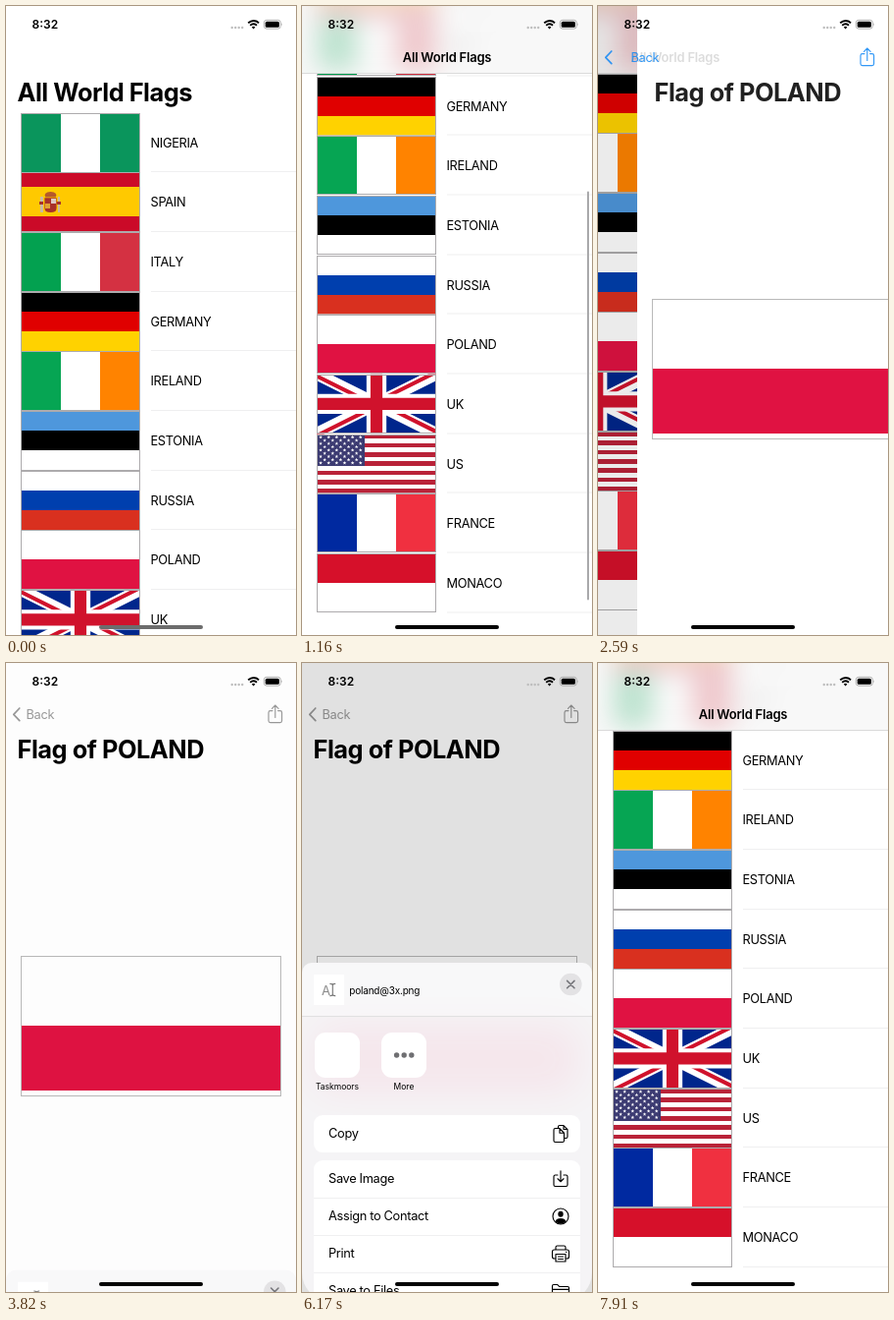
Write an HTML page that moves like this. It is 296 px wide and 640 px high and loops after 8 s.

```html
<!DOCTYPE html>
<html lang="en">
<head>
<meta charset="utf-8">
<title>All World Flags</title>
<style>
html, body { margin: 0; width: 100%; height: 100%; overflow: hidden; background: #fff; }
body { position: relative; font: 12.8px Inter, "Liberation Sans", sans-serif; letter-spacing: -.025em; color: #000; }
div, svg, span { position: absolute; box-sizing: border-box; }
span { white-space: nowrap; }
svg { overflow: visible; }
.page { left: 0; top: 0; width: 296px; height: 640px; overflow: hidden; background: #fff; }
.line { fill: none; stroke: currentColor; stroke-width: 1.15; stroke-linecap: round; stroke-linejoin: round; }

.big { left: 11.5px; top: 70px; font-size: 25.4px; font-weight: 700; letter-spacing: -.019em; line-height: 36px; }
.small { left: 0; width: 296px; top: 42px; line-height: 20px; text-align: center; font-size: 13px; font-weight: 600; letter-spacing: -.018em; }

#list { transform: translateX(calc(var(--d) * .3px - 88.8px)); }
.scroll { left: 0; top: 0; width: 296px; transform: translateY(calc(var(--s) * -1px)); }
.row { left: 0; width: 296px; height: 60.67px; line-height: 60.67px; }
.row svg { left: 15px; top: 0; width: 122px; height: 60.67px; overflow: hidden; }
.row rect { shape-rendering: crispEdges; }
.row span { left: 147.5px; top: 1px; }
.row i { position: absolute; left: 148px; right: 0; bottom: 0; height: 1px; background: #efeff0; }
.row.hit { background: rgba(209, 209, 214, var(--hit)); }
.cover, .bar { left: 0; top: 0; width: 296px; height: 69px; overflow: hidden; }
.cover { background: #fff; opacity: calc(1 - var(--bar)); }
.bar { opacity: var(--bar); background: #f8f8f8; border-bottom: .5px solid #dadada; }
.glow { left: 0; top: -30px; width: 296px; height: 95px; overflow: hidden; opacity: .24; filter: blur(13px); }
.glow .scroll { top: 30px; }
#thumb { left: 290.9px; top: 0; width: 2.4px; height: 416px; border-radius: 2px; background: #a9a9ab; opacity: var(--thumb); transform: translateY(calc(var(--thumbY) * 1px)); }
#shade { inset: 0; background: #000; opacity: calc(var(--p) * .09); }

#detail { transform: translateX(calc(var(--d) * 1px)); }
#detail .big { opacity: var(--p); transform: translateX(calc(var(--d) * .15px)); }
#flag { left: 15px; top: 298px; width: 266px; height: 142.5px; border: 1px solid #b9b9b9; }
#flag div { left: 0; top: 70px; width: 264px; height: 66px; background: #e01242; }

#nav { left: 0; top: 0; color: var(--tint); }
#nav .small { color: #000; opacity: calc(var(--bar) * (1 - var(--p))); transform: translateX(calc(var(--p) * -80px)); }
#chev, #back { opacity: var(--back); }
#back { left: 20.5px; top: 43px; line-height: 20px; transform: translateX(calc(var(--d) * .325px)); }
#share { opacity: var(--share); }

#dim { left: 0; top: 0; width: 296px; height: 640px; background: #000; opacity: calc((1 - var(--k)) * .12); }
#sheet { left: 0; top: 295px; width: 296px; height: 345px; border-radius: 10px 10px 30px 30px; overflow: hidden; background: #f5f4f6; transform: translateY(calc(var(--k) * 347px)); }
.blush { left: 15px; top: 75px; width: 266px; height: 66px; background: #ff1450; opacity: .06; filter: blur(20px); transform: translateY(calc(var(--k) * -347px)); }
.head { left: 0; top: 0; width: 296px; height: 54.5px; background: rgba(255, 255, 255, .3); border-bottom: 1px solid #e0dfe1; }
.pic { left: 12px; top: 12px; width: 31px; height: 31px; background: #fff; }
.tile { top: 71px; width: 46px; height: 46px; border-radius: 11px; background: #fff; }
.label { top: 120px; width: 72px; text-align: center; font-size: 8.5px; line-height: 12px; letter-spacing: 0; }
.card { left: 12px; width: 272px; border-radius: 9px; background: #fff; }
.card span { left: 15px; line-height: 38px; }
.card svg { left: 242px; width: 20px; height: 20px; }
.card i { position: absolute; left: 0; right: 0; height: 1px; background: #f0f0f1; }

#status { left: 0; top: 0; }
#home { left: 95px; top: 629.7px; width: 106px; height: 4.2px; border-radius: 3px; background: var(--home); }
</style>
</head>
<body>
<div class="page" id="list">
  <div class="scroll"><span class="big">All World Flags</span></div>
  <div id="thumb"></div>
  <div class="cover"></div>
  <div class="bar"><div class="glow"><div class="scroll"></div></div></div>
  <div id="shade"></div>
</div>

<div class="page" id="detail">
  <span class="big">Flag of POLAND</span>
  <div id="flag"><div></div></div>
</div>

<div id="nav">
  <span class="small">All World Flags</span>
  <svg id="chev" class="line" width="20" height="64"><path d="M13.8 46 7.8 52.3l6 6.3" stroke-width="1.7"/></svg>
  <span id="back">Back</span>
  <svg id="share" class="line" width="296" height="64"><path d="M272 48.6h-2.2q-1.8 0-1.8 1.8v8.4q0 1.8 1.8 1.8h10q1.8 0 1.8-1.8v-8.4q0-1.8-1.8-1.8h-2.2M274.8 55.5V43.2M271.5 46.3l3.3-3.3 3.3 3.3"/></svg>
</div>

<div id="dim"></div>

<svg id="status" width="296" height="40">
  <g fill="#bdbdbd"><circle cx="230.7" cy="22" r="1.2"/><circle cx="234.2" cy="22" r="1.2"/><circle cx="237.7" cy="22" r="1.2"/><circle cx="241.2" cy="22" r="1.2"/></g>
  <g fill="none" stroke="#000" stroke-width="1.9"><path d="M247.2 17.2q5.4-4.6 10.8 0M249.2 19.7q3.4-2.8 6.8 0"/></g>
  <path d="M250.8 21.4q1.8-1.4 3.6 0l-1.8 2z"/>
  <rect x="263.3" y="14.3" width="17" height="8.8" rx="2.7" fill="none" stroke="#a5a5a5" stroke-width=".9"/>
  <rect x="264.7" y="15.7" width="14.2" height="6" rx="1.5"/>
  <path d="M281.3 17.2q1.4 1.5 0 3z" fill="#a5a5a5"/>
</svg>
<span style="left:26.5px;top:9px;line-height:20px;font-size:12px;font-weight:600;letter-spacing:0">8:32</span>

<div id="sheet">
  <div class="blush"></div>
  <div class="head"></div>
  <div class="pic"></div>
  <span style="left:20px;top:18px;line-height:20px;font-size:13px;color:#8a8a8a">A</span>
  <svg class="line" width="40" height="40" style="color:#777"><path d="M28.8 21.3q2.5 0 2.5 1.4v9.5q0 1.4-2.5 1.4M33.8 21.3q-2.5 0-2.5 1.4M33.8 33.6q-2.5 0-2.5-1.4"/></svg>
  <span style="left:48.3px;top:18px;line-height:20px;font-size:10px;letter-spacing:-.02em">poland@3x.png</span>
  <svg width="296" height="50"><circle cx="274.3" cy="22" r="11.3" fill="#e3e2e4"/><path d="m270.6 18.3 7.4 7.4m0-7.4-7.4 7.4" stroke="#77777c" stroke-width="1.6" stroke-linecap="round"/></svg>
  <div class="tile" style="left:13px"></div>
  <div class="tile" style="left:81px"></div>
  <svg width="130" height="110" fill="#6f6f72"><circle cx="96.600" cy="94" r="2.700"/><circle cx="104.200" cy="94" r="2.700"/><circle cx="111.800" cy="94" r="2.700"/></svg>
  <span class="label" style="left:0">Taskmoors</span>
  <span class="label" style="left:68px">More</span>
  <div class="card" id="copy" style="top:154.5px;height:38.5px"></div>
  <div class="card" id="more" style="top:200.5px;height:152px"></div>
</div>
<div id="home"></div>

<script>
const $ = id => document.getElementById(id);
const rect = (x, y, w, h, c) => `<rect x="${x}" y="${y}" width="${w}" height="${h}" fill="${c}"/>`;

// Flags live in a 60 x 30 box
const rows = (...list) => list.map((c, i) => rect(0, i * 30 / list.length, 60, 30 / list.length, c)).join('');
const cols = (...list) => list.map((c, i) => rect(i * 20, 0, 20, 30, c)).join('');

function spain() {
  const red = '#cb0a28', gold = '#ffc900', dark = '#a8322a';
  return rows(red, gold, gold, red) +
    rect(9.9, 12.2, 1.2, 8, '#c9b9a2') + rect(18.7, 12.2, 1.2, 8, '#c9b9a2') +
    rect(9.5, 15, 2, 1.1, dark) + rect(18.3, 15, 2, 1.1, dark) +
    `<path d="M12 13h6v5q0 2.3-3 2.3t-3-2.3z" fill="${dark}"/>` +
    rect(15, 13.4, 2.5, 2.2, '#dcc9c4') + rect(12.5, 16, 2.4, 2.2, '#e0a436') +
    `<path d="M12.4 12.6q-1.2-2.4 2.6-2.7 3.8.3 2.6 2.7z" fill="#b4592c"/>`;
}

function uk() {
  const blue = '#00268c', red = '#d0122c';
  return rect(0, 0, 60, 30, blue) +
    '<path d="M0 0 60 30M60 0 0 30" stroke="#fff" stroke-width="6"/>' +
    `<path d="M0 1 30 16M60 29 30 14M0 31 30 16M60-1 30 14" stroke="${red}" stroke-width="2"/>` +
    '<path d="M30 0v30M0 15h60" stroke="#fff" stroke-width="10"/>' +
    `<path d="M30 0v30M0 15h60" stroke="${red}" stroke-width="6"/>`;
}

function star(x, y) {
  const pts = Array.from({ length: 10 }, (_, i) => {
    const a = i * Math.PI / 5, r = i % 2 ? .4 : .95;
    return [(x + r * Math.sin(a)).toFixed(2), (y - r * Math.cos(a)).toFixed(2)];
  });
  return `<polygon points="${pts.join(' ')}" fill="#fff"/>`;
}

function us() {
  let art = rows(...Array.from({ length: 13 }, (_, i) => i % 2 ? '#fff' : '#b92238'));
  art += rect(0, 0, 24, 30 * 7 / 13, '#3c3b72');
  for (let r = 1; r < 10; r++)
    for (let c = 1; c < 12; c++)
      if ((r + c) % 2 === 0) art += star(c * 2, r * 1.615);
  return art;
}

const flags = {
  NIGERIA: cols('#0a955c', '#fff', '#0a955c'),
  SPAIN: spain(),
  ITALY: cols('#03a150', '#fff', '#d43142'),
  GERMANY: rows('#000', '#e00000', '#ffd200'),
  IRELAND: cols('#06a553', '#fff', '#ff8300'),
  ESTONIA: rows('#4e97dc', '#000', '#fff'),
  RUSSIA: rows('#fff', '#003fae', '#d9301f'),
  POLAND: rows('#fff', '#e01242'),
  UK: uk(),
  US: us(),
  FRANCE: cols('#0029a0', '#fff', '#f03040'),
  MONACO: rows('#d6102a', '#fff')
};

// The same rows fill the list and the blurred copy behind the bar
const rowsHtml = Object.entries(flags).map(([name, art], i) =>
  `<div class="row${name === 'POLAND' ? ' hit' : ''}" style="top:${108.6 + i * 60.67}px">
    <svg viewBox="0 0 60 30" preserveAspectRatio="none">${art}
      <rect x=".25" y=".25" width="59.5" height="29.5" fill="none" stroke="#adabad" stroke-width=".5"/></svg>
    <span>${name}</span><i></i></div>`).join('');
document.querySelectorAll('.scroll').forEach(el => el.insertAdjacentHTML('beforeend', rowsHtml));

// Share sheet actions
const icons = {
  Copy: 'M7.5 4.5V3q0-1.5 1.5-1.5h4l4 4V13q0 1.5-1.5 1.5H14M13 1.5v4h4M3 6q0-1.5 1.5-1.5H9l4.5 4.7V17q0 1.5-1.5 1.5H4.5Q3 18.5 3 17zM9 4.5v4.7h4.5',
  'Save Image': 'M7 6H4.5Q3 6 3 7.5V16q0 1.5 1.5 1.5h11Q17 17.5 17 16V7.5Q17 6 15.5 6H13M10 1.8v10.7M7 9.7l3 3 3-3',
  'Assign to Contact': 'M2 10a8 8 0 0 1 16 0 8 8 0 0 1-16 0',
  Print: 'M5 6V3.5Q5 2 6.5 2h7Q15 2 15 3.5V6M5 15H3.5Q1.5 15 1.5 13V8q0-2 2-2h13q2 0 2 2v5q0 2-2 2H15M5 10.5h10V18H5zM7.5 13h5M7.5 15.5h5M15.5 8.3h.4',
  'Save to Files': 'M1.5 15.5V4.8q0-1.3 1.3-1.3h4l2 2h8.4q1.3 0 1.3 1.3v8.7q0 1.3-1.3 1.3H2.8q-1.3 0-1.3-1.3M1.5 8.3h17'
};
const person = '<path d="M10 4.7a2.7 3 0 0 1 0 6 2.7 3 0 0 1 0-6M4.5 15.3q1.2-3.3 5.5-3.3t5.5 3.3q-2.2 2.4-5.5 2.4t-5.5-2.4" fill="#000" stroke="none"/>';
const action = (name, i) =>
  `<span style="top:${i * 38 + .5}px">${name}</span>
   <svg class="line" viewBox="0 0 20 20" style="top:${i * 38 + 9.5}px"><path d="${icons[name]}"/>${name.startsWith('Assign') ? person : ''}</svg>` +
  (i ? `<i style="top:${i * 38}px"></i>` : '');
const [first, ...rest] = Object.keys(icons);
$('copy').innerHTML = action(first, 0);
$('more').innerHTML = rest.map(action).join('');

const beats = [[0, 0, 1], [500, 730, 3], [870, 870, 1], [1030, 1690, 7], [2330, 2330, 1], [2470, 2470, 1],
  [2590, 2910, 4], [3560, 3560, 1], [3820, 4270, 5], [6170, 6900, 7], [7190, 7190, 1], [7350, 7910, 6]]
  .flatMap(([a, b, n]) => Array.from({ length: n }, (_, i) => a + (b - a) * i / Math.max(1, n - 1)));
const hold = t => beats.filter(b => b <= t).pop() || 0;

function track(t, ...keys) {
  const i = keys.findIndex(k => k[0] > t);
  if (i === 0) return keys[0][1];
  if (i < 0) return keys[keys.length - 1][1];
  const [t0, v0] = keys[i - 1], [t1, v1] = keys[i];
  return v0 + (v1 - v0) * (t - t0) / (t1 - t0);
}
const within = (t, a, b) => t >= a && t < b;
const ease = x => x * x * (3 - 2 * x);

function pose(t) {
  const s = track(t, [470, 0], [730, 182], [870, 213], [1030, 219], [1690, 222]);
  const d = track(t, [2440, 296], [2470, 225], [2590, 40], [2690, 12], [2910, 0],
    [7320, 0], [7350, 30], [7462, 190], [7574, 262], [7686, 286], [7800, 296]);
  const p = 1 - d / 296;
  const k = t < 5000
    ? track(t, [3780, 1], [3820, .93], [3935, .48], [4045, .15], [4155, .03], [4270, 0])
    : ease(track(t, [6110, 0], [6700, 1]));
  return {
    s, d, p, k,
    bar: s > 39 ? 1 : 0,
    thumb: within(t, 500, 2470) ? 1 : 0,
    thumbY: Math.max(72, 164 + (s - 182) * .65),
    hit: t < 2330 ? 0 : track(t, [7350, 1], [7800, 0]),
    back: p * (within(t, 7190, 7350) ? .25 : 1),
    share: p * (within(t, 3560, 3820) ? .25 : 1),
    tint: within(t, 3820, 6290) ? '#999' : '#1288f5',
    home: t < 500 ? '#6c6c6c' : '#000'
  };
}

const start = performance.now();
function draw() {
  const now = hold((performance.now() - start) % 8000);
  for (const [key, value] of Object.entries(pose(now))) document.body.style.setProperty('--' + key, value);
  requestAnimationFrame(draw);
}
draw();
</script>
</body>
</html>
```
